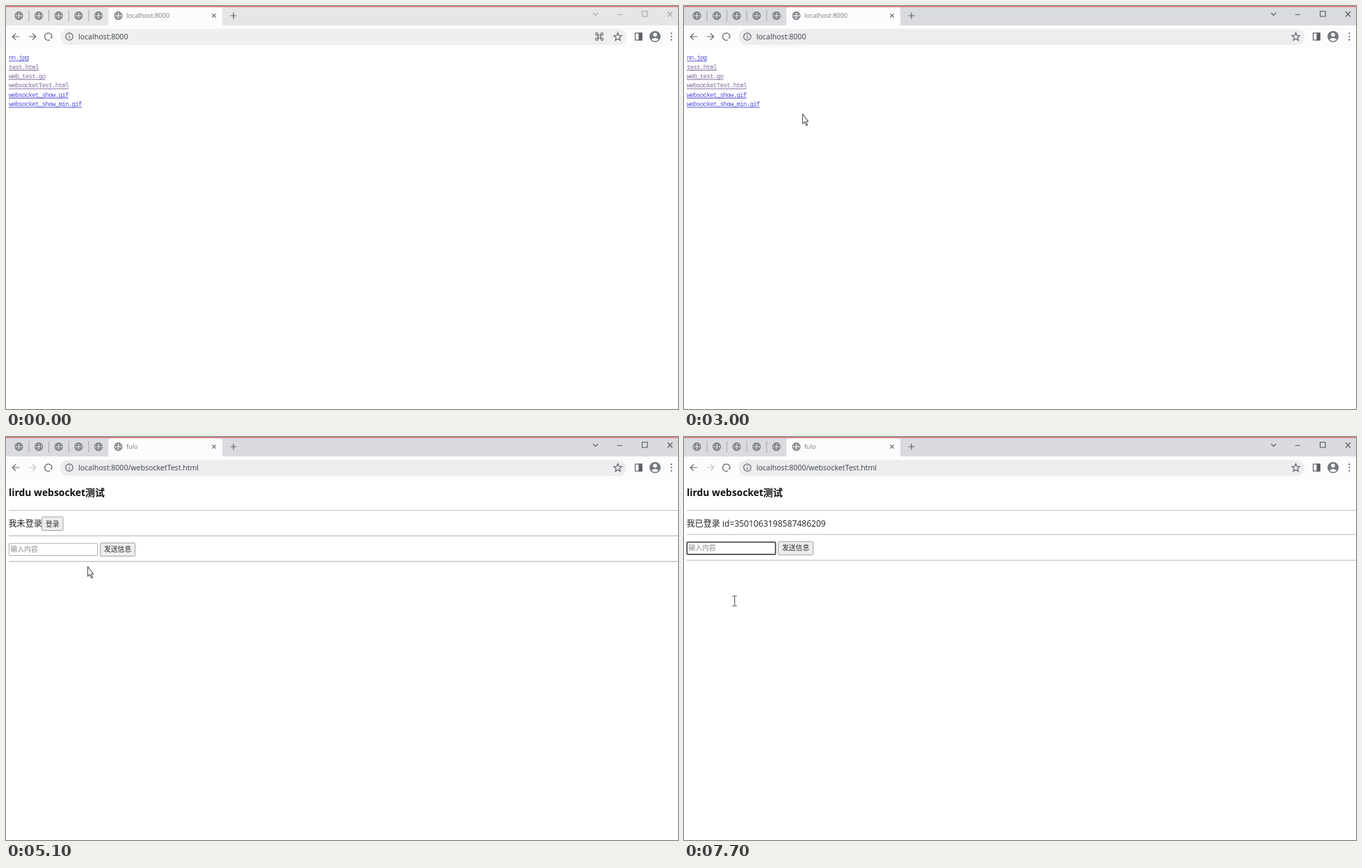
Write an HTML page that moves like this. It is 966 by 580 pixels and loops after 8000 ms.

```html
<!DOCTYPE html>
<html lang="zh-CN">
<head>
<meta charset="utf-8">
<title>Browser demo</title>
<style>
  html, body { margin: 0; width: 100%; height: 100%; overflow: hidden; background: #fff; }
  svg { display: block; width: 966px; height: 580px; font-family: 'Open Sans', 'Noto Sans CJK SC', 'Noto Sans CJK', sans-serif; }
  text { white-space: pre; }
  .icon { fill: none; stroke: #5f6266; stroke-width: 1.2; }
  .link { font: 9.2px 'Liberation Mono', monospace; letter-spacing: -.75px; }
  .url { font-size: 10.6px; fill: #3c4043; }
  .title { font-size: 9.2px; fill: #75787c; }
  .heading { font-size: 13.9px; font-weight: 700; fill: #111; }
  .body { font-size: 12.1px; fill: #222; }
  .small { font-size: 9.8px; fill: #2c2c2c; }
  .rule { fill: none; stroke: #c6c6c6; stroke-width: 1.4; }
  .button { fill: #ededed; stroke: #a2a2a2; stroke-width: 1; }
</style>
</head>
<body>
<svg id="stage" viewBox="0 0 966 580">
  <defs>
    <g id="globe" fill="none" stroke="#6a6d71" stroke-width="1.1">
      <circle r="5.4"/><ellipse rx="2.5" ry="5.4"/><path d="M-5 -2H5M-5 2H5"/>
    </g>
  </defs>
  <rect width="966" height="580" fill="#fff"/>
  <rect id="strip" width="966" height="28"/>
  <path d="M147 28V6q0-4 4-4H307q4 0 4 4V28Z" fill="#fbfcfd"/>
  <rect y="28" width="966" height="33" fill="#fbfcfd"/>
  <rect width="966" height="1.5" fill="#e4736f"/>
  <g id="tabs"></g>
  <path class="icon" d="M296.3 11.2l5.4 5.4m0-5.4l-5.4 5.4M322.5 14h9m-4.5-4.5v9"/>
  <g id="controls" fill="none" stroke-width="1.1">
    <path d="M844 10l3.5 3.5L851 10M878.5 12.2h7.5M914.5 7.5h7.5v7.5h-7.5ZM951 8l7 7.5m0-7.5l-7 7.5"/>
  </g>

  <rect x="78" y="33" width="814" height="23" rx="11.5" id="omnibox"/>
  <path class="icon" d="M19 44H9.5m4.5-4.7L9.3 44l4.7 4.7"/>
  <path class="icon" id="forward" d="M33 44h9.5M38 39.3l4.7 4.7-4.7 4.7"/>
  <path class="icon" d="M63 48.8A5.2 5.2 0 1 1 65.9 45.4M65.9 46.6l-1.6-1.6"/>
  <g class="icon"><circle cx="91" cy="44" r="5.2"/><path d="M91 43.4v3.4M91 40.8v1.2"/></g>
  <path class="icon" id="loops" d="M851 42h4v4h-4Zm0 0h-1.6a1.7 1.7 0 1 1 1.6-1.7Zm4 0v-1.7a1.7 1.7 0 1 1 1.6 1.7Zm0 4h1.6a1.7 1.7 0 1 1-1.6 1.7Zm-4 0v1.7a1.7 1.7 0 1 1-1.6-1.7Z"/>
  <path class="icon" d="M879.5 38.4l1.6 3.9 4.1.3-3.2 2.7 1 4.1-3.5-2.2-3.5 2.2 1-4.1-3.2-2.7 4.1-.3Z"/>
  <g class="icon"><rect x="904.5" y="39" width="9.5" height="10"/><path d="M910 39h4v10h-4Z" fill="#5a5d61"/></g>
  <circle cx="933" cy="44" r="8" fill="#74777b"/>
  <g fill="#fbfcfd">
    <circle cx="933" cy="41.3" r="2.8"/>
    <path d="M927.8 48.2q5.2-4.4 10.4 0-5.2 4.8-10.4 0Z"/>
  </g>
  <path d="M956.5 39.3v.01M956.5 44v.01M956.5 48.7v.01" stroke="#5a5d61" stroke-width="2.2" stroke-linecap="round"/>
  <text id="title" class="title" x="173" y="17.4"></text>
  <text id="url" class="url" x="104" y="48.2"></text>

  <g id="listing"></g>
  <g id="status"><rect y="578" width="153" height="2" fill="#dedfe1"/></g>

  <g id="page">
    <text class="heading" x="4" y="85">lirdu</text>
    <text class="heading" x="40" y="85">websocket测试</text>
    <path class="rule" d="M4 105.6H966"/>
    <text id="state" class="body" x="3.5" y="129"></text>
    <g id="login">
      <rect id="loginBox" class="button" x="51.5" y="115" width="30.5" height="19.5" rx="1.5"/>
      <text class="small" x="57" y="128.8">登录</text>
    </g>
    <g id="form">
      <path class="rule" d="M4 142.2H966M4 179.2H966"/>
      <rect id="field" x="4.3" y="153.2" width="127.2" height="17.4" rx="1" fill="#fff"/>
      <text class="small" x="6.5" y="165.2" style="fill:#858585">输入内容</text>
      <path id="caret" d="M7.5 155.5v13" stroke="#222"/>
      <rect class="button" x="135.5" y="152.5" width="50" height="19" rx="1.5"/>
      <text class="small" x="141" y="165.3">发送信息</text>
    </g>
  </g>

  <g id="arrow" fill="#fff" stroke="#55585c" stroke-width="1.1" stroke-linejoin="round">
    <path d="M.5 .5V14.5L3.4 11.8 5.7 17 7.5 16.2 5.3 11.2H8.5Z"/>
  </g>
  <g id="hand" fill="#fff" stroke="#4b4e52" stroke-width="1.2" stroke-linejoin="round">
    <path d="M3 12V2.2Q3 .7 4.2 .7 5.4 .7 5.4 2.2V8Q7.5 6.6 8 8.6 10 7.4 10.4 9.4 12.6 8.6 12.7 10.8V15Q12.7 17.4 11.2 20.6H4.6Q3.8 17.6 .8 13.6 -.4 11.6 1 11.2 2 11 3 12Z"/>
  </g>
  <g id="beam" fill="none" stroke="#6a6d71" stroke-width="1.3">
    <path d="M-3.2 -7.2H-1.2L0 -6.4 1.2 -7.2H3.2M-3.2 7.2H-1.2L0 6.4 1.2 7.2H3.2M0 -6.5V6.5"/>
  </g>
</svg>
<script>
const LOOP = 8000, STEP = 100;
const $ = id => document.getElementById(id);
const show = (id, on) => { $(id).style.display = on ? '' : 'none'; };
const paint = (id, attrs) => {
  for (const name in attrs) $(id).setAttribute(name, attrs[name]);
};
const start = performance.now();

const RED = '#f0444c', BLUE = '#5050dc', VISITED = '#806a9c';
const files = [
  ['nn.jpg', BLUE], ['test.html', VISITED], ['web_test.go', VISITED],
  ['websocketTest.html', VISITED], ['websocket_show.gif', BLUE], ['websocket_show_min.gif', BLUE]
];
$('listing').innerHTML = files.map(([name, color], i) => {
  const y = 77.4 + i * 13.35;
  return `<g id="file${i}" fill="${color}"><text class="link" x="4" y="${y}">${name}</text>` +
    `<rect x="4" y="${y + 1.2}" width="${name.length * 4.77}" height="1"/></g>`;
}).join('');

const tabX = i => 18.5 + i * 28.6;
$('tabs').innerHTML = [0, 1, 2, 3, 4, 5].map(i =>
  `<use href="#globe" x="${tabX(i)}" y="14"/>` +
  (i < 4 ? `<path d="M${tabX(i) + 14.5} 6v16" stroke="#a3a5a8"/>` : '')).join('');

// Pointer stops: time, x, y
const pointer = [
  [400, 797, 45], [500, 705, 56], [600, 600, 64], [800, 390, 67], [1000, 210, 68], [1200, 108, 68],
  [1300, 94, 71], [1400, 79, 72], [1600, 52, 33],
  [2500, 52, 33], [2600, 54, 45], [2800, 118, 110], [3000, 170, 155], [3100, 174, 161],
  [3200, 166, 166], [3400, 128, 169], [3700, 85, 172],
  [4500, 85, 172], [4700, 130, 183], [4900, 156, 187], [5100, 117, 186], [5300, 78, 186],
  [6400, 78, 186], [6600, 77, 210], [6800, 74, 234], [7000, 72.7, 236]
];

function pointerAt(t) {
  const i = pointer.findIndex(p => p[0] > t);
  if (i < 0) return pointer[pointer.length - 1].slice(1);
  const [t0, x0, y0] = pointer[Math.max(0, i - 1)], [t1, x1, y1] = pointer[i];
  const k = t1 > t0 ? (t - t0) / (t1 - t0) : 0;
  return [x0 + (x1 - x0) * k, y0 + (y1 - y0) * k];
}

function render(t) {
  const focused = t >= 1900, opened = t >= 4100, loggedIn = t >= 6000, typing = t >= 7200;

  paint('strip', { fill: focused ? '#d9dbdf' : '#e5e6e6' });
  paint('controls', { stroke: focused ? '#55585c' : '#a2a4a6' });
  paint('omnibox', { fill: focused ? '#ecedef' : '#eeefef' });
  show('loops', !focused);
  $('forward').style.stroke = opened ? '#c0c2c5' : '';
  $('title').textContent = opened ? 'fulo' : 'localhost:8000';
  $('url').textContent = 'localhost:8000' + (opened ? '/websocketTest.html' : '');

  show('listing', !opened);
  paint('file3', { fill: t >= 3900 ? RED : VISITED });
  show('status', t >= 3900 && t < 4400);

  show('page', opened);
  $('state').textContent = loggedIn ? '我已登录 id=3501063198587486209' : '我未登录';
  show('login', !loggedIn);
  $('loginBox').style.fill = t >= 5800 ? '#f5f5f5' : t >= 5300 ? '#e3e3e3' : '';
  paint('form', { transform: `translate(0 ${loggedIn ? -1.8 : 0})` });
  paint('field', {
    stroke: typing ? '#45484d' : t >= 6700 ? '#8c8c8c' : '#ababab',
    'stroke-width': typing ? 1.8 : 1
  });
  show('caret', typing && t < 7700);

  const shape = t < 400 ? '' : t >= 6700 ? 'beam' : t >= 3700 && !opened ? 'hand' : 'arrow';
  for (const id of ['arrow', 'hand', 'beam']) show(id, id === shape);
  if (shape) paint(shape, { transform: `translate(${pointerAt(t)})` });
}

function tick() {
  const t = (performance.now() - start) % LOOP;
  render(Math.floor(t / STEP) * STEP);
  requestAnimationFrame(tick);
}
tick();
</script>
</body>
</html>
```
